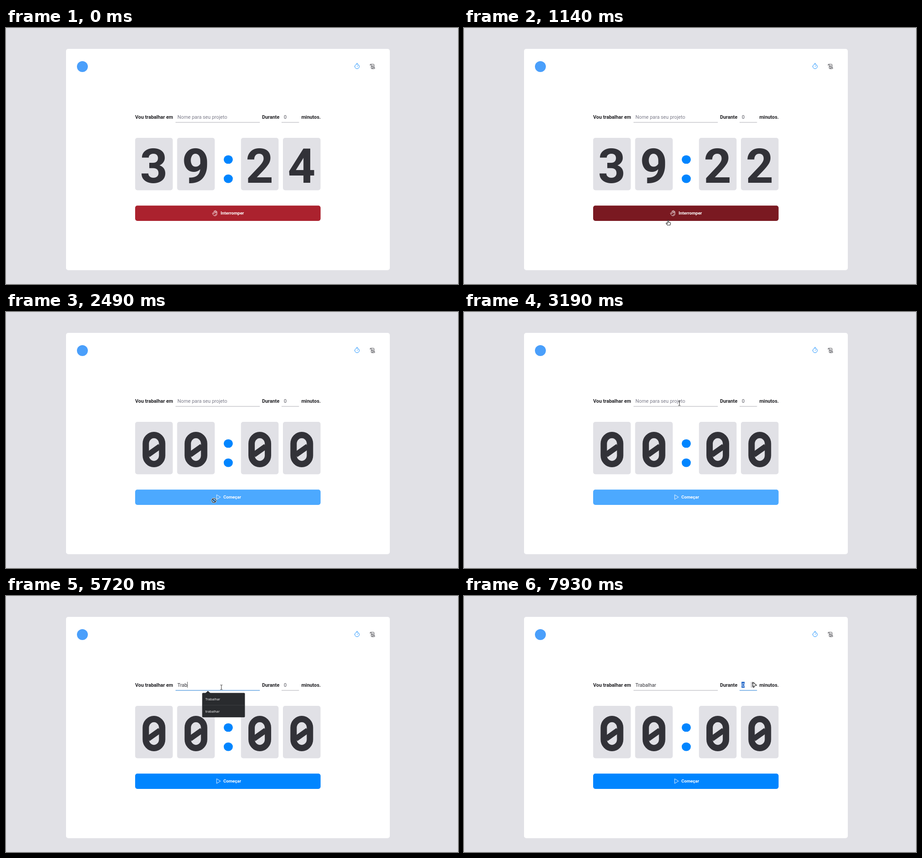
These frames come from a looping animation (994x564 px, 8000 ms). An HTML page:

```html
<!DOCTYPE html>
<html lang="pt-BR">
<head>
<meta charset="utf-8">
<title>Timer</title>
<style>
  html, body { margin: 0; width: 100%; height: 100%; overflow: hidden; background: #e1e1e6; }
  svg { display: block; width: 100vw; height: 100vh; }
  text { font: 10.82px Roboto, sans-serif; fill: #323238; white-space: pre; }
  .label { font-weight: 700; fill: #202024; }
  .action { font-weight: 700; font-size: 9.62px; fill: #fff; }
  .digit { font-weight: 700; font-size: 105.8px; text-anchor: middle; }
  .option { font: 7.3px "Open Sans", "Noto Sans", sans-serif; fill: #fff; }
  .icon { fill: none; stroke-width: 16; stroke-linecap: round; stroke-linejoin: round; }
  .pointer { fill: #fff; stroke: #222; stroke-width: 1.1; stroke-linejoin: round; }
</style>
</head>
<body>
<svg viewBox="0 0 994 564">
  <rect x="132" y="46" width="712" height="487.5" rx="4.8" fill="#fff"/>
  <circle cx="168" cy="85" r="12" fill="#4a9ffb"/>
  <path class="icon" stroke="#0085ff" stroke-width="18" transform="translate(764.8 77.6) scale(.05625)"
    d="M40 128a88 88 0 1 0 176 0a88 88 0 1 0-176 0M128 128l40-40M104 8h48"/>
  <path class="icon" stroke="#323238" transform="translate(798.2 77.6) scale(.05625)"
    d="M110 104h58M110 136h58M45 82A24 24 0 1 1 88 64V192A24 24 0 1 0 131 174H219A24 24 0 0 1 200 216H112M64 40H176A24 24 0 0 1 200 64V174"/>

  <text class="label" x="284" y="200">Vou trabalhar em</text>
  <text class="label" x="563" y="200">Durante</text>
  <text class="label" x="649.5" y="200">minutos.</text>
  <rect id="nameLine" x="372.8" y="207.3" width="185.4" height="1.2"/>
  <rect id="minLine" x="606" y="207.3" width="38.4" height="1.2"/>
  <text id="name" x="377" y="199.5"></text>
  <rect id="caret" y="189" width=".8" height="13" fill="#222"/>
  <rect id="selection" x="610.3" y="189" width="6.8" height="13.2" fill="#2468c8"/>
  <text id="minutes" x="611" y="199.5">0</text>
  <g id="spinner">
    <rect x="630.5" y="189.3" width="9.5" height="12.6" fill="#d2d2d5"/>
    <path d="M633 194l2.2-2.4 2.2 2.4zM633 197.5l2.2 2.4 2.2-2.4z" fill="#505050"/>
  </g>

  <g id="clock"></g>
  <g fill="#0085ff">
    <rect x="478.8" y="280.5" width="20" height="18.6" rx="9.4"/>
    <rect x="478.8" y="322.8" width="20" height="18.6" rx="9.4"/>
  </g>

  <rect id="button" x="284" y="391.3" width="407.8" height="33.6" rx="4.8"/>
  <rect id="ring" x="283.4" y="390.7" width="409" height="34.8" rx="5.4" fill="none" stroke="#123f78" stroke-width="1.2"/>
  <g id="stop">
    <path class="icon" stroke="#fff" transform="translate(452.3 400.8) scale(.05625)"
      d="M168 124V76a20 20 0 0 1 40 0V152a80 80 0 0 1-149 40L30 140a20 20 0 0 1 34-20L88 152V60a20 20 0 0 1 40 0V116M128 60V44a20 20 0 0 1 40 0V124M172 168a40 40 0 0 0-40 36"/>
    <text class="action" x="472" y="411.3">Interromper</text>
  </g>
  <g id="start">
    <path class="icon" stroke="#fff" transform="translate(459.2 400.8) scale(.05625)" d="M72 40V216L216 128Z"/>
    <text class="action" x="478" y="411.3">Começar</text>
  </g>

  <g id="fullList"></g>
  <g id="shortList"></g>

  <circle id="press" r="7.6" fill="#ffc400" fill-opacity=".65"/>
  <g id="mouse">
    <path id="arrow" class="pointer" d="M0 0L9 6.7L4.6 7.8L1.7 11.6Z"/>
    <path id="hand" class="pointer" stroke-width=".7" d="M-1 1a1 1 0 0 1 2 0V5L4.4 5.8Q5.4 6.2 5.2 7.4L4.2 11.3H-1.6L-4.4 7.6Q-4.6 6-3 6.4L-1 7.6Z"/>
    <path id="beam" d="M-2.4-5H-.5L0-4.4L.5-5H2.4M0-4.6V4.6M-2.4 5H-.5L0 4.4L.5 5H2.4" fill="none" stroke="#222" stroke-width=".9"/>
    <g id="blocked" fill="none">
      <circle r="4.6" stroke="#fff" stroke-width="2.6"/>
      <path d="M-3.2-3.2L3.2 3.2M4.6 0A4.6 4.6 0 1 1-4.6 0A4.6 4.6 0 1 1 4.6 0" stroke="#222" stroke-width="1.3"/>
    </g>
  </g>
</svg>
<script>
const LOOP = 8000;
const $ = id => document.getElementById(id);
const show = (id, on) => $(id).style.display = on ? '' : 'none';
const within = (v, from, to) => v >= from && v < to;

// Clock cards; the zero is drawn with a slash.
$('clock').innerHTML = [284, 376.3, 516.7, 609].map(x => `
  <rect x="${x}" y="242" width="82.7" height="115.4" rx="4.8" fill="#e1e1e6"/>
  <text class="digit" x="${x + 41}" y="340.6"></text>
  <g class="zero" transform="translate(${x + 41.4} 303)" fill="none" stroke="#323238">
    <rect x="-18" y="-32" width="36" height="64" rx="18" ry="19" stroke-width="14"/>
    <path d="M-13 11.5L13-7" stroke-width="12"/>
  </g>`).join('');
const digits = document.querySelectorAll('.digit');
const zeros = document.querySelectorAll('.zero');

function buildList(id, top, recent) {
  let y = 229.5, items = '';
  const add = word => { items += `<text class="option" x="438.5" y="${y}">${word}</text>`; y += 21.7; };
  top.forEach(add);
  const line = y - 10.8;
  y += 5.4;
  recent.forEach(add);
  $(id).innerHTML = `<path d="M438.5 214L444 209L449.5 214Z" fill="#292b2e"/>
    <rect x="431.4" y="213.5" width="94" height="${y - 224.5}" rx="2" fill="#292b2e"/>
    <rect x="431.4" y="${line}" width="94" height=".7" fill="#45474b"/>${items}`;
}
buildList('fullList', ['Trabalhar', 'Estudar', 'Planejar', 'Implementar'], ['estudar', 'projeto 1', 's']);
buildList('shortList', ['Trabalhar'], ['trabalhar']);

// Pointer stops: time, x, y.
const route = [
  [380, 922, 556], [450, 760, 480], [520, 600, 425], [590, 500, 393], [660, 465.5, 383.6],
  [720, 465.5, 383.6], [900, 453, 416], [1140, 449, 423], [1210, 449, 423], [1600, 456.8, 414.5],
  [2160, 456.8, 415.5], [2490, 457, 415.5], [2620, 484, 385], [2780, 518, 320],
  [2920, 514, 265], [3060, 488, 218], [3190, 473.6, 201], [6980, 473.6, 201],
  [7120, 510, 211], [7330, 590, 212], [7530, 634.7, 190], [LOOP, 634.7, 190]
];
const keys = [4990, 5250, 5450, 5720, 5920, 6050, 6250, 6350, 6450];
const presses = [[1700, 1900], [3460, 3590], [7730, 7860]];
const carets = [[3460, 3930], [4450, 6980], [7510, 7730]];
const any = (spans, t) => spans.some(([a, b]) => within(t, a, b));

function pointerAt(t) {
  const i = Math.max(1, route.findIndex(p => p[0] > t));
  const [t0, x0, y0] = route[i - 1], [t1, x1, y1] = route[i];
  const k = Math.max(0, (t - t0) / (t1 - t0));
  return [x0 + (x1 - x0) * k, y0 + (y1 - y0) * k];
}

function pointerKind(x, y, running) {
  if (within(y, 391, 425) && within(x, 284, 692)) return running ? 'hand' : 'blocked';
  if (within(y, 188, 209) && (within(x, 373, 558) || within(x, 606, 630))) return 'beam';
  return 'arrow';
}

function draw(t) {
  const running = t < 1900;
  const [x, y] = pointerAt(t);
  const kind = pointerKind(x, y, running);
  const time = t < 580 ? '3924' : t < 1140 ? '3923' : t < 1700 ? '3922' : running ? '3921' : '0000';
  digits.forEach((d, i) => {
    const zero = time[i] === '0';
    d.textContent = zero ? '' : time[i];
    zeros[i].style.display = zero ? '' : 'none';
  });

  const hover = kind === 'hand' && t > 380;
  const button = $('button');
  button.setAttribute('fill', running ? (hover ? '#7a1921' : '#ab222e') : '#0085ff');
  button.setAttribute('opacity', running || t >= keys[0] ? 1 : .7);
  show('ring', within(t, 1700, 1900));
  show('stop', running);
  show('start', !running);

  const typed = 'Trabalhar'.slice(0, keys.filter(k => t >= k).length);
  const name = $('name');
  name.textContent = typed || 'Nome para seu projeto';
  name.style.fill = typed ? '#323238' : '#7c7c8a';
  $('caret').setAttribute('x', 377.1 + (typed ? name.getComputedTextLength() : 0));
  show('caret', any(carets, t));
  $('nameLine').setAttribute('fill', within(t, 3460, 7730) ? '#3f8edb' : '#b9b9bf');
  $('minLine').setAttribute('fill', t >= 7730 ? '#3f8edb' : '#b9b9bf');
  show('selection', t >= 7860);
  $('minutes').style.fill = t >= 7860 ? '#fff' : '#505059';
  show('spinner', t > 7300 && x > 606);
  show('fullList', within(t, 3590, 5120));
  show('shortList', within(t, 5120, 7730));

  show('mouse', t >= 380);
  $('mouse').setAttribute('transform', `translate(${x} ${y})`);
  for (const id of ['arrow', 'hand', 'beam', 'blocked']) show(id, id === kind);
  show('press', any(presses, t));
  $('press').setAttribute('transform', `translate(${x} ${y})`);
}

const began = performance.now();
function tick() {
  draw((performance.now() - began) % LOOP);
  requestAnimationFrame(tick);
}
tick();
</script>
</body>
</html>
```
